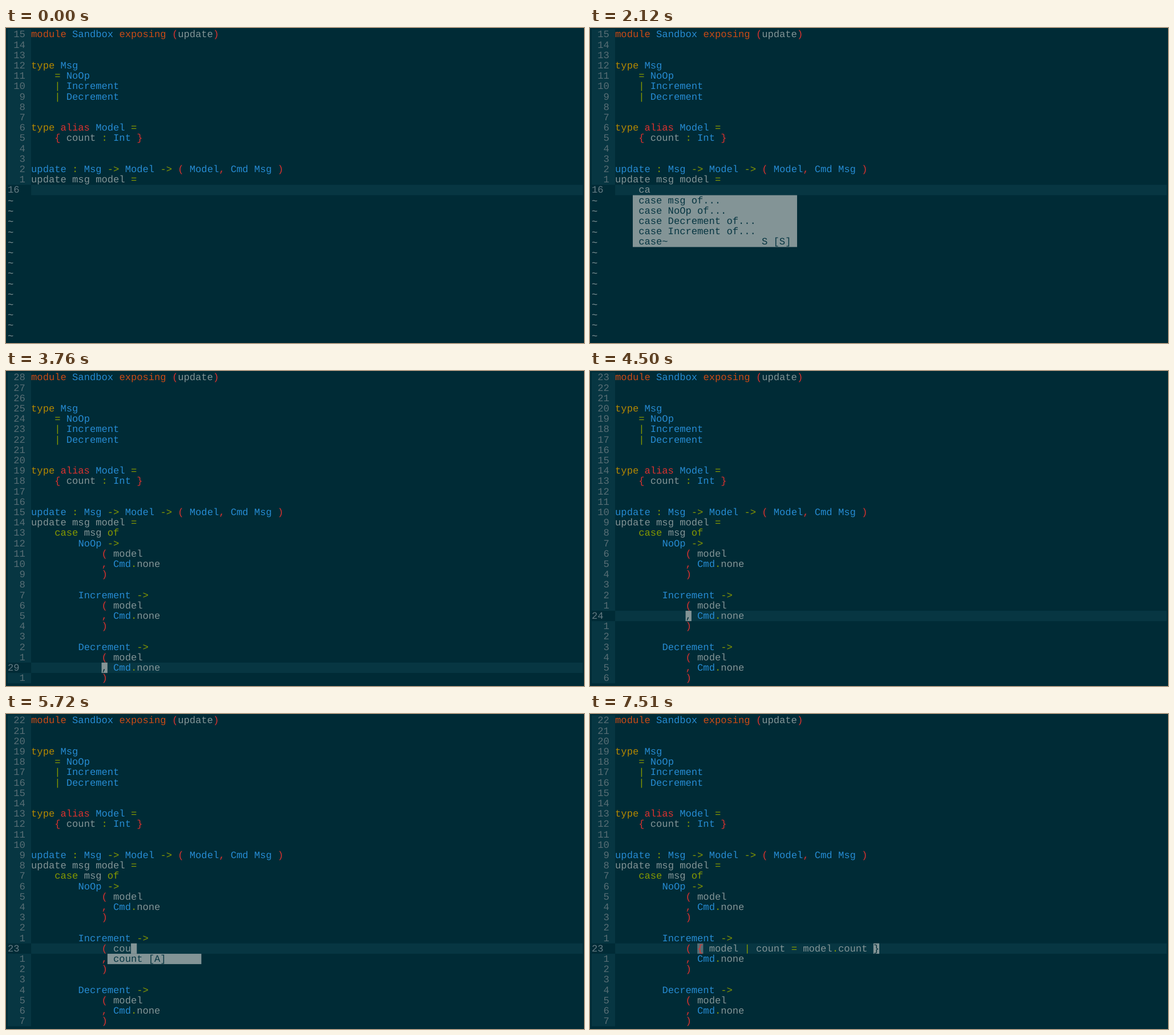
Animation, 1013 px wide and 553 px high, one loop 8000 ms. Source, as an HTML page:

```html
<!DOCTYPE html>
<html lang="en">
<head>
<meta charset="utf-8">
<title>Editor completion</title>
<style>
html, body { margin: 0; width: 100%; height: 100%; overflow: hidden; background: #002b36; }
svg { display: block; }
text {
  font: 17.143px "Liberation Mono", "DejaVu Sans Mono", monospace;
  white-space: pre;
  text-rendering: geometricPrecision;
}
</style>
</head>
<body>
<svg id="stage" width="1013" height="553" viewBox="0 0 1013 553"></svg>
<script>
const LOOP = 8000, ROWS = 30, COLS = 94, CW = 72 / 7, RH = 18.2, LEFT = 44.1, TOP = 2.3;
const C = {
  bg: '#002b36', line: '#073642', dim: '#586e75', text: '#839496', pale: '#eee8d5',
  yellow: '#b58900', orange: '#cb4b16', red: '#dc322f', blue: '#268bd2', green: '#859900'
};
const KEYWORDS = {
  module: C.orange, exposing: C.orange, type: C.yellow, alias: C.red,
  case: C.green, of: C.green, '↪': C.dim, '^M': C.bg
};

const head = `module Sandbox exposing (update)


type Msg
    = NoOp
    | Increment
    | Decrement


type alias Model =
    { count : Int }


update : Msg -> Model -> ( Model, Cmd Msg )
update msg model =`.split('\n');

const branch = name =>
  [`        ${name} ->`, '            ( model', '            , Cmd.none', '            )'];
const body = ['    case msg of', ...branch('NoOp'), '    ', ...branch('Increment'), '    ', ...branch('Decrement')];
const wrapped = body.join('^M').replace(/ +\)(?=\^M)/g, '\n↪)').split('\n');
const full = [...head, ...body];
const typed = s => [...head, s];
const edited = s => full.map((l, i) => i === 22 ? '            ( ' + s : l);

const cases = ['case msg of...', 'case NoOp of...', 'case Decrement of...', 'case Increment of...',
  'case~'.padEnd(21) + 'S [S]'];
const record = '{ model | count = model.count }';
const menu = (row, col, width, items, sel = -1) => ({ row, col, width, items, sel });
const caseMenu = (row, sel) => menu(row, 3, 28, cases, sel);
const short = menu(23, 13, 16, ['count [A]']);
const wide = sel => menu(23, 13, 37, ['count'.padEnd(32) + '[A]', record], sel);

// Each step changes only the fields it names; at = [row, column] of the cursor block.
const steps = [
  [0, { lines: typed(''), cur: 15, at: null, match: [], pop: null }],
  [440, { at: [15, 4] }],
  [1440, { lines: typed('    c'), at: null }],
  [1490, { at: [15, 5] }],
  [1680, { lines: typed('    ca'), at: null }],
  [1740, { at: [15, 6] }],
  [1810, { pop: caseMenu(16) }],
  [2120, { at: null }],
  [2200, { lines: [...head, ...wrapped], at: [17, 90], pop: caseMenu(18, 0) }],
  [2590, { at: null, pop: null }],
  [2640, { lines: full, cur: 29 }],
  [2700, { at: [29, 12] }],
  [2750, { match: [[27, 12], [29, 12]] }],
  [3760, { cur: 28, at: [28, 12], match: [] }],
  [3990, { cur: 27, at: [27, 12], match: [[27, 12], [29, 12]] }],
  [4080, { cur: 26, at: [26, 12], match: [] }],
  [4170, { cur: 25, at: [25, 0] }],
  [4360, { cur: 24, at: [24, 12] }],
  [4430, { match: [[22, 12], [24, 12]] }],
  [4500, { cur: 23, at: [23, 12], match: [] }],
  [4630, { cur: 22, at: [22, 12], match: [[22, 12], [24, 12]] }],
  [4700, { at: [22, 13], match: [] }],
  [4780, { at: [22, 14] }],
  [4960, { at: null }],
  [5030, { at: [22, 14] }],
  [5280, { lines: edited(''), at: null }],
  [5340, { at: [22, 14] }],
  [5560, { lines: edited('c'), at: [22, 15] }],
  [5620, { lines: edited('co'), at: [22, 16] }],
  [5670, { lines: edited('cou'), at: [22, 17] }],
  [5720, { pop: short }],
  [5840, { pop: wide() }],
  [6020, { lines: edited('count'), at: [22, 19], pop: wide(0) }],
  [6400, { lines: edited(record), at: [22, 45], pop: wide(1) }],
  [7040, { at: null, pop: null }],
  [7110, { at: [22, 45] }],
  [7190, { at: [22, 44], match: [[22, 14], [22, 44]] }],
  [7440, { at: null }],
  [7510, { at: [22, 44] }]
];
let last = {};
const states = steps.map(([time, change]) => last = { ...last, ...change, time });

const px = col => LEFT + col * CW;
const py = row => TOP + row * RH;
const box = (row, col, w, h, fill) =>
  `<rect x="${px(col)}" y="${py(row)}" width="${w * CW}" height="${h * RH}" fill="${fill}"/>`;
const escape = s => s.replace(/&/g, '&amp;').replace(/</g, '&lt;').replace(/>/g, '&gt;');
const write = (row, col, s, fill, bold) =>
  `<text x="${px(col)}" y="${py(row) + 14}" fill="${fill}"${bold ? ' font-weight="bold"' : ''}>${escape(s)}</text>`;

function colour(word, line, col) {
  if (KEYWORDS[word]) return KEYWORDS[word];
  if (/^[A-Z]/.test(word) || (col === 0 && line.startsWith('update :'))) return C.blue;
  if (/^[(){},]$/.test(word)) return C.red;
  return /^\w/.test(word) ? C.text : C.green;
}

function code(line, row) {
  let out = '';
  for (const { 0: word, index } of line.matchAll(/\^M|->|\w+|[^\s\w]/g)) {
    if (word === '^M') out += box(row, index, 2, 1, C.yellow);
    out += write(row, index, word, colour(word, line, index));
  }
  return out;
}

function lineNumber(row, cur) {
  return row === cur
    ? write(row, -4, String(row + 1), '#657b83')
    : write(row, -4, String(Math.abs(row - cur)).padStart(3), C.dim);
}

function popup({ row, col, width, items, sel }) {
  let out = box(row, col, width, items.length, C.text);
  if (sel >= 0) out += box(row + sel, col, width, 1, C.dim);
  items.forEach((s, i) => out += write(row + i, col + 1, s, i === sel ? C.pale : C.line));
  return out;
}

function draw({ lines, cur, at, match, pop }) {
  const isTail = line => line[0] === '↪';
  const tails = lines.filter(isTail).length;
  const below = lines.length - cur - 1 - tails;
  const charAt = ([row, col]) => lines[row][col] || ' ';
  const atCursor = cell => at && cell[0] === at[0] && cell[1] === at[1];

  let out = `<rect width="1013" height="553" fill="${C.bg}"/>`;
  out += box(0, -4, 4, cur, C.line) + box(cur, 0, COLS, 1 + tails, C.line);
  if (below) out += box(cur + 1, -4, 4, below, C.line);
  lines.forEach((line, row) => {
    if (!isTail(line)) out += lineNumber(row, cur);
    out += code(line, row);
  });
  for (let row = lines.length; row < ROWS; row++) out += write(row + 0.08, -4, '~', C.text, true);

  for (const cell of match) {
    if (!atCursor(cell)) out += box(...cell, 1, 1, C.dim) + write(...cell, charAt(cell), C.red, true);
  }
  if (pop) out += popup(pop);
  if (at) out += box(...at, 1, 1, C.text) + write(...at, charAt(at), C.bg, match.some(atCursor));
  return out;
}

const stage = document.getElementById('stage');
let shown = null;
function show(time) {
  const state = states.findLast(s => s.time <= time);
  if (state === shown) return;
  shown = state;
  stage.innerHTML = draw(state);
}
function tick() {
  show(performance.now() % LOOP);
  requestAnimationFrame(tick);
}
tick();
</script>
</body>
</html>
```
